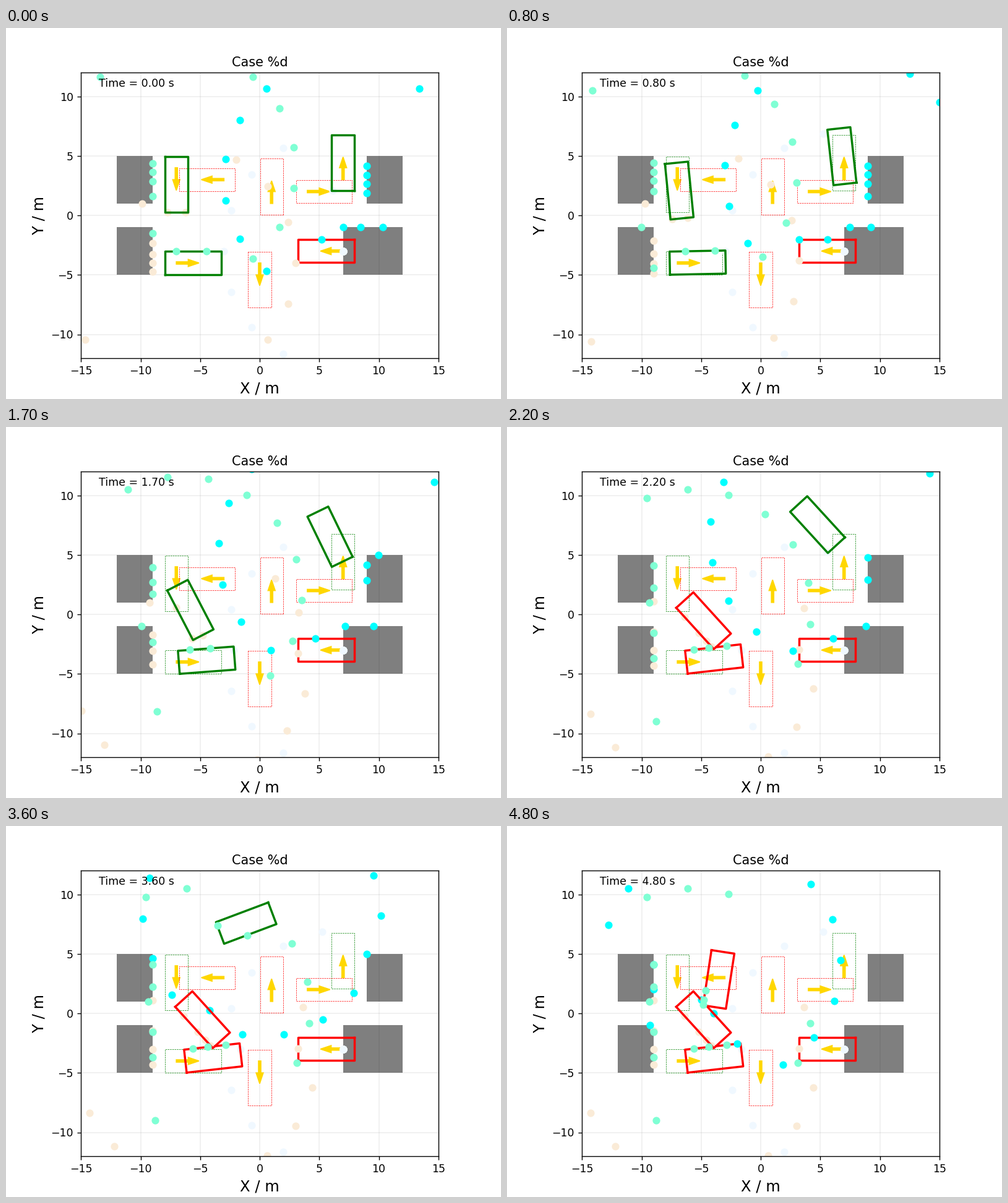
Write a matplotlib script that moves like this. It is 800x600 px and loops after 4.9 s.

```python
import numpy as np
import matplotlib.pyplot as plt
from matplotlib.animation import FuncAnimation

FRAMES, DT = 49, 0.1
REAR, FRONT, HALF_W = 0.929, 3.76, 0.971
BODY = (-REAR, FRONT, -HALF_W, HALF_W)
RAYS, REACH = 18, 10.0

# Obstacles as xmin, xmax, ymin, ymax
WALLS = [(-12, -9, 1, 5), (-12, -9, -5, -1), (9, 12, 1, 5), (7, 12, -5, -1)]

# Start pose, curvature, distance = a t^2 + b t, time of the crash
CARS = [
    dict(start=(7, -3, 180), bend=0.0, a=0.0, b=0.0, crash=0.0),
    dict(start=(-7, -4, 0), bend=0.0667, a=0.335, b=0.1, crash=2.1),
    dict(start=(7, 3, 90), bend=0.195, a=0.7305, b=0.12, crash=4.5),
    dict(start=(-7, 4, -90), bend=0.195, a=0.895, b=-0.078, crash=2.1),
]
GOALS = [(-3, 3, 180), (1, 1, 90), (4, 2, 0), (0, -4, -90)]
COLORS = ["aliceblue", "antiquewhite", "aqua", "aquamarine"]


def to_rad(pose):
    return pose[0], pose[1], np.radians(pose[2])


def outline(pose):
    """Closed outline of a car whose rear axle sits at the pose."""
    x, y, h = pose
    u = np.array([-REAR, FRONT, FRONT, -REAR, -REAR])
    v = np.array([-1, -1, 1, 1, -1]) * HALF_W
    return (x + u * np.cos(h) - v * np.sin(h),
            y + u * np.sin(h) + v * np.cos(h))


def drive(car):
    """Poses of one car, advanced with Euler steps until it crashes."""
    x, y, h = to_rad(car["start"])
    poses, gone = [(x, y, h)], 0.0
    for i in range(1, FRAMES):
        t = min(i * DT, car["crash"])
        dist = car["a"] * t * t + car["b"] * t
        step, gone = dist - gone, dist
        x += step * np.cos(h)
        y += step * np.sin(h)
        h += step * car["bend"]
        poses.append((x, y, h))
    return poses


def hit_box(x, y, angles, box, pose=(0, 0, 0)):
    """Distance along each ray to a box given in the frame of a pose."""
    px, py, h = pose
    dx, dy = x - px, y - py
    origin = (dx * np.cos(h) + dy * np.sin(h), dy * np.cos(h) - dx * np.sin(h))
    near, far = np.full(len(angles), -np.inf), np.full(len(angles), np.inf)
    for o, d, lo, hi in zip(origin, (np.cos(angles - h), np.sin(angles - h)),
                            box[::2], box[1::2]):
        d = np.where(np.abs(d) < 1e-12, 1e-12, d)
        t0, t1 = (lo - o) / d, (hi - o) / d
        near = np.maximum(near, np.minimum(t0, t1))
        far = np.minimum(far, np.maximum(t0, t1))
    hit = (near <= far) & (far > 1e-9)
    return np.where(hit, np.maximum(near, 0), np.inf)


def scan(k, poses):
    """End points of the rays sent out by car k."""
    x, y, h = poses[k]
    angles = h + np.radians(np.arange(RAYS) * 360 / RAYS)
    dist = np.full(RAYS, REACH)
    for wall in WALLS:
        dist = np.minimum(dist, hit_box(x, y, angles, wall))
    for j, other in enumerate(poses):
        if j != k:
            dist = np.minimum(dist, hit_box(x, y, angles, BODY, other))
    return x + dist * np.cos(angles), y + dist * np.sin(angles)


fig = plt.figure(figsize=(6.4, 4.8), dpi=125)
ax = fig.add_subplot()
ax.set_xlim(-15, 15)
ax.set_ylim(-12, 12)
ax.set_aspect("equal", adjustable="box")
ax.set_axisbelow(True)
ax.grid(linewidth=0.2)
ax.set_xticks(range(-15, 16, 5))
ax.set_yticks(range(-10, 11, 5))
ax.set_title("Case %d")
ax.set_xlabel("X / m", fontsize=14)
ax.set_ylabel("Y / m", fontsize=14)

for x0, x1, y0, y1 in WALLS:
    ax.fill([x0, x1, x1, x0], [y0, y0, y1, y1], facecolor="k", alpha=0.5)

marks = [(c["start"], "green") for c in CARS] + [(g, "red") for g in GOALS]
for place, color in marks:
    pose = to_rad(place)
    ax.plot(*outline(pose), linestyle="--", linewidth=0.4, color=color)
    ax.arrow(pose[0], pose[1], np.cos(pose[2]), np.sin(pose[2]),
             width=0.2, color="gold")

bodies, dots = [], []
for color in COLORS:
    bodies += ax.plot([], [], linewidth=2)
    dots += ax.plot([], [], "o", color=color)
clock = ax.text(0.05, 0.95, "", transform=ax.transAxes)

tracks = [drive(car) for car in CARS]


def draw(i):
    t = i * DT
    poses = [track[i] for track in tracks]
    for k, car in enumerate(CARS):
        bodies[k].set_data(*outline(poses[k]))
        bodies[k].set_color("red" if t > car["crash"] - DT / 2 else "green")
        dots[k].set_data(*scan(k, poses))
    clock.set_text(f"Time = {t:.2f} s")
    return [*bodies, *dots, clock]


anim = FuncAnimation(fig, draw, frames=FRAMES, interval=100,
                     repeat=True, repeat_delay=0)
plt.show()
```
